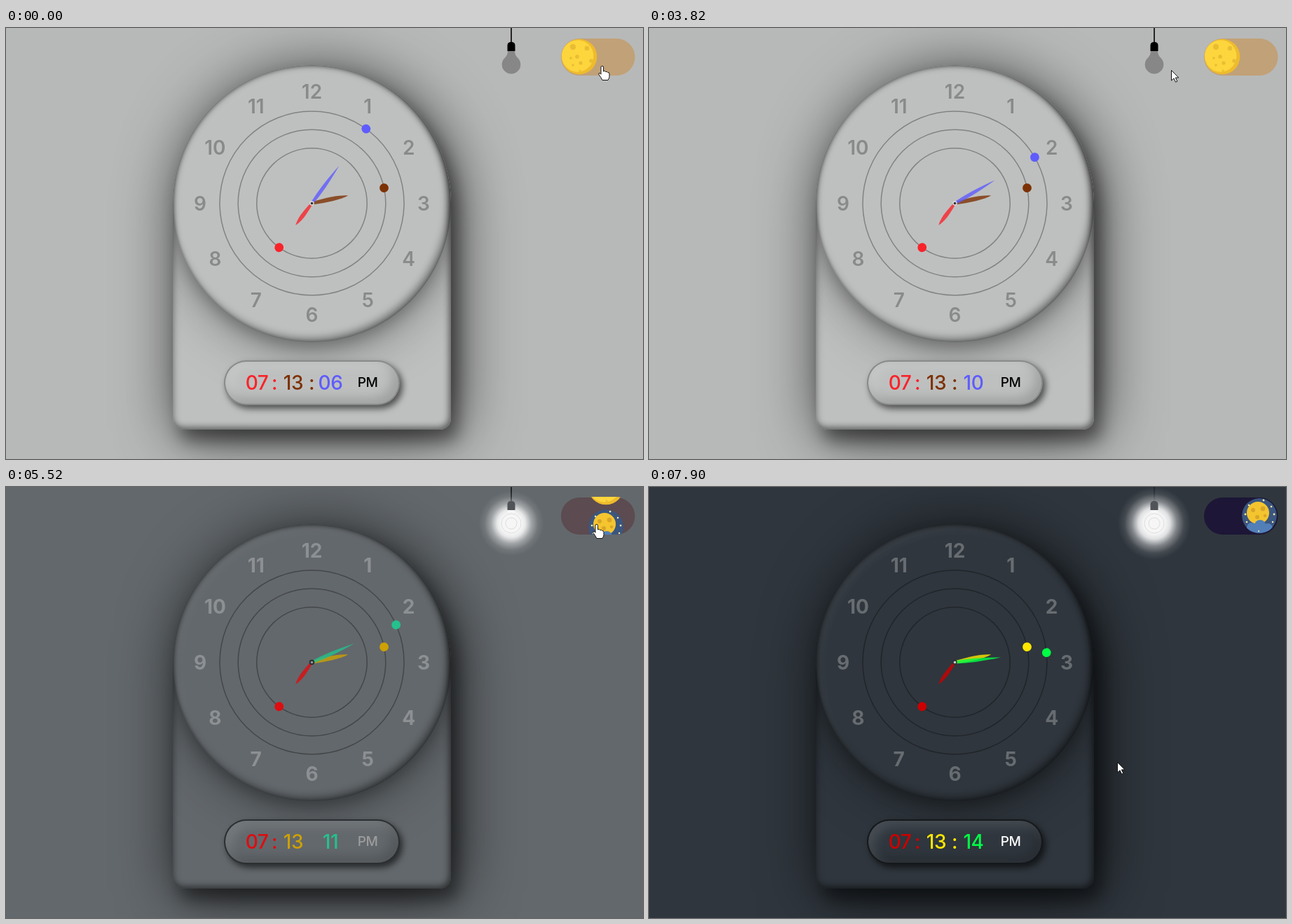
Animation, 909 px wide and 616 px high, one loop 7990 ms. Source, as an HTML page:

```html
<!DOCTYPE html>
<html lang="en">
<head>
<meta charset="utf-8">
<title>Day and night clock</title>
<style>
@property --dusk  { syntax: "<number>";  inherits: true; initial-value: 0; }
@property --slide { syntax: "<number>";  inherits: true; initial-value: 0; }
@property --lit   { syntax: "<number>";  inherits: true; initial-value: 0; }
@property --sec   { syntax: "<integer>"; inherits: true; initial-value: 6; }

html, body { margin: 0; width: 100%; height: 100%; overflow: hidden; }
body {
  --loop: 7990ms infinite;
  --night: calc(var(--dusk) * 100%);
  --page: color-mix(in srgb, #2f363d var(--night), #b7b9b8);
  --surface: color-mix(in srgb, #fff calc(10% - 10% * var(--lit)), var(--page));
  --ink: color-mix(in srgb, rgb(255 255 255 / .27) calc(var(--lit) * 100%), rgb(0 0 0 / .28));
  --hour: color-mix(in srgb, #cc0000 var(--night), #f9232a);
  --minute: color-mix(in srgb, #ffe600 var(--night), #7d3205);
  --second: color-mix(in srgb, #00ff45 var(--night), #5f5cff);
  --label: color-mix(in srgb, #fff var(--night), #000);
  position: relative;
  background: var(--page);
  font-family: Inter, sans-serif;
  animation: dusk var(--loop) ease, slide var(--loop) ease,
             lit var(--loop) step-end, tick var(--loop) step-end;
}

/* Theme change and seconds */
@keyframes dusk  { 0%, 66.46% { --dusk: 0; }  73.84%, 100% { --dusk: 1; } }
@keyframes slide { 0%, 66.27% { --slide: 0; } 72.9%, 100%  { --slide: 1; } }
@keyframes lit   { 0% { --lit: 0; } 66.3%, 100% { --lit: 1; } }
@keyframes tick {
  0% { --sec: 6; }      7.6% { --sec: 7; }    20% { --sec: 8; }
  32.38% { --sec: 9; }  44.4% { --sec: 10; }  56.42% { --sec: 11; }
  70.15% { --sec: 12; } 82.4% { --sec: 13; }  95.1%, 100% { --sec: 14; }
}
@keyframes blink {
  0%, 9.6%, 22.25%, 34.64%, 46.9%, 58.65%, 71.3%, 83.7%, 96.6%, 100% { opacity: 1; }
  3.35%, 16.2%, 28.85%, 41.2%, 53.4%, 65.65%, 77.6%, 89.7% { opacity: 0; }
}

/* Clock body */
.base, .face, .pill { position: absolute; box-sizing: border-box; background: var(--surface); }
.base {
  left: 238px; top: 53px; width: 397px; height: 521px;
  border-radius: 198px 198px 16px 16px;
  box-shadow: 10px 16px 25px rgb(0 0 0 / .45), 8px 8px 85px rgb(0 0 0 / .7);
}
.clip { position: absolute; inset: 0; border-radius: inherit; overflow: hidden; }
.clip::after {
  content: ""; position: absolute; inset: 0; border-radius: inherit;
  box-shadow: inset 0 0 12px rgb(0 0 0 / .4), inset -3px -4px 9px rgb(0 0 0 / .3);
}
.face {
  left: 0; top: 0; width: 397px; height: 396px; border-radius: 50%;
  box-shadow: 0 8px 22px rgb(0 0 0 / .25), 0 10px 75px rgb(0 0 0 / .36),
    inset 0 0 5px rgb(0 0 0 / .4), inset -4px -5px 12px rgb(0 0 0 / .42),
    inset 6px 7px 14px rgb(255 255 255 / .07);
}
.pill {
  left: 311px; top: 475px; width: 251px; height: 64px; border-radius: 32px;
  border: 2px solid rgb(0 0 0 / calc(.28 + .27 * var(--lit)));
  box-shadow: 4px 5px 10px rgb(0 0 0 / .6),
    inset -8px -8px 16px rgb(0 0 0 / .17), inset 8px 8px 16px rgb(255 255 255 / .12);
}

/* Drawing layer */
svg { position: absolute; left: 0; top: 0; overflow: hidden; }
.rings { fill: none; stroke: rgb(0 0 0 / .32); stroke-width: 1.5; }
.numerals {
  fill: var(--ink); font-size: 28px; text-anchor: middle;
  font-weight: calc(600 + 100 * var(--lit));
}
.hour { fill: var(--hour); }
.minute { fill: var(--minute); }
.second { fill: var(--second); }
.spin { transform: rotate(calc(var(--sec) * 6deg)); }
.hand { opacity: .8; }
.pin {
  fill: color-mix(in srgb, #ccc var(--night), #333);
  stroke: color-mix(in srgb, #2a2f35 calc(var(--lit) * 100%), #ddd);
  stroke-width: calc(1.4px + 1.4px * var(--lit) * (1 - var(--dusk)));
  r: calc(2.5px + .8px * var(--lit) * (1 - var(--dusk)));
}
.digits { position: absolute; inset: 0; font-size: 28px; font-weight: 500; line-height: 34px; }
.digits span { position: absolute; top: 490px; width: 60px; text-align: center; letter-spacing: -.4px; }
.digits .h { left: 328px; color: var(--hour); }
.digits .m { left: 380px; color: var(--minute); }
.digits .s { left: 433px; color: var(--second); counter-reset: sec var(--sec); }
.digits .s::after { content: counter(sec, decimal-leading-zero); }
.digits .c1 { left: 353px; color: var(--hour); }
.digits .c2 { left: 406px; color: var(--minute); animation: blink var(--loop) step-end; }
.digits .pm { left: 486px; font-size: 19px; color: var(--label); }

/* Lamp and switch */
.cord { stroke: color-mix(in srgb, #1b2025 var(--night), #000); stroke-width: 1.6; }
.socket { fill: color-mix(in srgb, #505357 calc(var(--lit) * 100%), #000); }
.bulb { fill: color-mix(in srgb, #f6f6f6 calc(var(--lit) * 100%), #878787); }
.filament { fill: none; stroke: rgb(205 205 205 / calc(.6 * var(--lit))); }
.glow {
  opacity: var(--lit);
  transform: scale(calc(.73 + .27 * var(--dusk)));
}
.track { fill: color-mix(in srgb, #1d1637 var(--night), #c1a178); }
.moons { transform: translate(calc(53px * var(--slide)), calc(-57px * var(--slide))); }

/* Pointer */
.pointer { animation: roam var(--loop) linear; }
.arrow { animation: arrow var(--loop) step-end; }
.grab { animation: grab var(--loop) step-end; }
.pointer path { fill: #fff; stroke: #111; stroke-width: 1; stroke-linejoin: round; }
@keyframes roam {
  0%, 1.1% { transform: translate(851px, 54px); }
  1.12%, 3.3% { transform: translate(849px, 96px); }
  6.8% { transform: translate(861px, 112px); }
  13%, 15.5% { transform: translate(848px, 113px); }
  20%, 39.2% { transform: translate(844px, 108px); }
  39.3% { transform: translate(851px, 95px); }
  41.3%, 43.5% { transform: translate(800px, 69px); }
  47.8%, 50% { transform: translate(745px, 60px); }
  54.5%, 76.6% { transform: translate(843px, 53px); }
  80% { transform: translate(760px, 45px); }
  85.1%, 87.4% { transform: translate(732px, 52px); }
  89.5% { transform: translate(560px, 150px); }
  92% { transform: translate(350px, 290px); }
  94.5% { transform: translate(480px, 400px); }
  96.6%, 97.7% { transform: translate(726px, 340px); }
  98.8%, 100% { transform: translate(668px, 393px); }
}
@keyframes arrow { 0%, 52.2% { opacity: 0; } 1.11%, 78.6%, 100% { opacity: 1; } }
@keyframes grab  { 0%, 52.2% { opacity: 1; } 1.11%, 78.6%, 100% { opacity: 0; } }
</style>
</head>
<body>
<div class="base"><div class="clip"><div class="face"></div></div></div>
<div class="pill"></div>

<svg width="909" height="616" viewBox="0 0 909 616">
  <defs>
    <radialGradient id="halo">
      <stop offset=".3" stop-color="#fff" stop-opacity=".95"/>
      <stop offset=".43" stop-color="#fff" stop-opacity=".85"/>
      <stop offset=".62" stop-color="#fff" stop-opacity=".4"/>
      <stop offset=".82" stop-color="#fff" stop-opacity=".1"/>
      <stop offset="1" stop-color="#fff" stop-opacity="0"/>
    </radialGradient>
    <clipPath id="slot"><rect x="792" y="14" width="106" height="54" rx="27"/></clipPath>
    <clipPath id="disc"><circle r="25"/></clipPath>
  </defs>

  <g transform="translate(436.5 250.5)">
    <g class="rings"><circle r="131.5"/><circle r="105.3"/><circle r="78.7"/></g>
    <g class="numerals" id="numerals"></g>
    <g class="hour" transform="rotate(216.5)">
      <circle cy="-78.7" r="6.4"/>
      <path class="hand" d="M-1.5 0Q-3 -14 -3 -23Q-2.5 -33 0 -39Q2.5 -33 3 -23Q3 -14 1.5 0z"/>
    </g>
    <g class="minute" transform="rotate(78)">
      <circle cy="-105.3" r="6.4"/>
      <path class="hand" d="M-2 0Q-3.2 -18 -3 -30Q-2.4 -45 0 -53Q2.4 -45 3 -30Q3.2 -18 2 0z"/>
    </g>
    <g class="second spin">
      <circle cy="-131.5" r="6.4"/>
      <path class="hand" d="M-2 0Q-3 -16 -2.6 -30Q-1.8 -50 0 -66Q1.8 -50 2.6 -30Q3 -16 2 0z"/>
    </g>
    <circle class="pin"/>
  </g>

  <path class="cord" d="M721 0V22"/>
  <g transform="translate(721 52)">
    <circle class="glow" r="52" fill="url(#halo)"/>
    <path class="socket" d="M-5.5 -19V-27Q-5.5 -32 0 -32Q5.5 -32 5.5 -27V-19z"/>
    <path class="bulb" d="M-5 -19H5Q5 -14 8.5 -10A13.3 13.3 0 1 1 -8.5 -10Q-5 -14 -5 -19z"/>
    <circle class="filament" r="8"/><circle class="filament" r="14"/>
  </g>

  <rect class="track" x="792" y="15" width="105.5" height="53" rx="26.5"/>
  <g clip-path="url(#slot)">
    <g class="moons">
      <g transform="translate(818 41)">
        <circle r="25.3" fill="#eebb2d"/>
        <circle cx="-2.3" cy="-1" r="22.7" fill="#fdd53d"/>
        <g fill="#e9bd32">
          <circle cx="-9" cy="-14" r="4.2"/><circle cx="11" cy="-12" r="3.3"/>
          <circle cx="-3" r="2.8"/><circle cx="-12" cy="2" r="1.8"/>
          <circle cx="2" cy="9" r="2.6"/><circle cx="17" cy="6" r="2.8"/>
          <circle cx="-9" cy="12" r="1.8"/><circle cx="1" cy="20" r="1.5"/>
        </g>
      </g>
      <g transform="translate(818 98)" clip-path="url(#disc)">
        <circle r="25" fill="#3b567f"/>
        <circle cx="-2" cy="-4" r="16" fill="#f4c52f"/>
        <g fill="#d9a528">
          <circle cx="-9" cy="-8" r="3"/><circle cx="5" cy="-10" r="3.4"/>
          <circle cx="-3" cy="2" r="3"/><circle cx="8" cy="0" r="2.2"/>
        </g>
        <g fill="#527fb8">
          <circle cx="-11" cy="17" r="7"/><circle cx="1" cy="14" r="8"/>
          <circle cx="12" cy="18" r="7"/><rect x="-18" y="18" width="37" height="7"/>
        </g>
        <g fill="#f5eaa8">
          <circle cx="-20" cy="-2" r="1.4"/><circle cx="-15" cy="-15" r="1.3"/>
          <circle cx="6" cy="-22" r="1.4"/><circle cx="17" cy="-13" r="1.3"/>
          <circle cx="21" cy="-2" r="1.4"/><circle cx="19" cy="9" r="1.2"/>
          <circle cx="-18" cy="9" r="1.3"/><circle cx="-1" cy="22" r="1.1"/>
        </g>
      </g>
    </g>
  </g>
</svg>

<div class="digits">
  <span class="h">07</span><span class="c1">:</span>
  <span class="m">13</span><span class="c2">:</span>
  <span class="s"></span><span class="pm">PM</span>
</div>

<svg width="909" height="616" viewBox="0 0 909 616">
  <g class="pointer">
    <path class="arrow" d="M.5 .5V15L4 12L6.5 17.3L8.8 16.2L6.3 11H10.8z"/>
    <path class="grab" d="M-2 2.2a1.8 1.8 0 0 1 3.6 0V8q2 -1.5 3.2 .6q2 -1 2.9 .9q2.3 -.4 2.3 2v4q0 2 -2 5h-8q-2 -4 -5 -8q-.8 -2.5 1.5 -2l1.5 1.7z"/>
  </g>
</svg>

<script>
const numerals = document.getElementById("numerals");
for (let n = 1; n <= 12; n++) {
  const angle = n * Math.PI / 6;
  const label = document.createElementNS(numerals.namespaceURI, "text");
  label.setAttribute("x", 159.5 * Math.sin(angle));
  label.setAttribute("y", 10 - 159.5 * Math.cos(angle));
  label.textContent = n;
  numerals.append(label);
}
</script>
</body>
</html>
```
